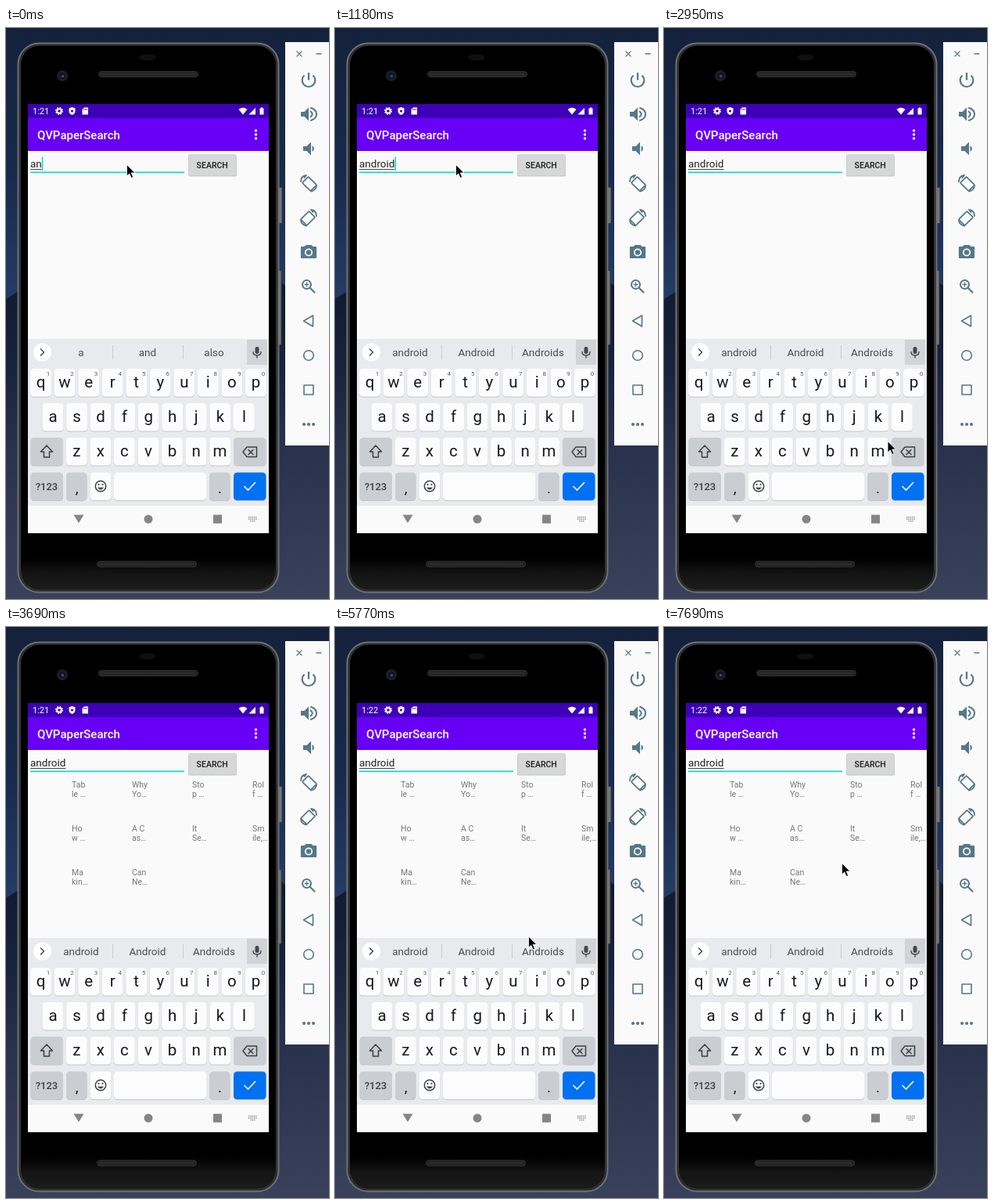
Animation, 413 px wide and 729 px high, one loop 8000 ms. Source, as an HTML page:

```html
<!DOCTYPE html>
<html lang="en">
<head>
<meta charset="utf-8">
<title>Article search</title>
<style>
  html, body { margin: 0; height: 100%; overflow: hidden; background: #14213b; }
  svg { display: block; width: 100%; height: 100%; }
  text { font-family: Roboto, sans-serif; }
  .mid { text-anchor: middle; }
  .line { fill: none; stroke-linecap: round; stroke-linejoin: round; }
</style>
</head>
<body>
<svg viewBox="0 0 413 729">
  <defs>
    <linearGradient id="sky" x2="0" y2="1">
      <stop offset="0" stop-color="#14213b"/>
      <stop offset=".25" stop-color="#182a4b"/>
      <stop offset=".5" stop-color="#263e68"/>
    </linearGradient>
    <linearGradient id="hill" x2="0" y2="1">
      <stop offset="0" stop-color="#0f182d"/>
      <stop offset=".3" stop-color="#17223c"/>
      <stop offset=".55" stop-color="#29324c"/>
      <stop offset="1" stop-color="#3a415a"/>
    </linearGradient>
    <linearGradient id="body" x2="0" y2="1">
      <stop offset=".94" stop-color="#000"/>
      <stop offset=".97" stop-color="#151515"/>
      <stop offset="1" stop-color="#1c1c1c"/>
    </linearGradient>
    <clipPath id="screen"><rect x="28" y="97" width="308" height="548"/></clipPath>
  </defs>

  <!-- Desktop -->
  <rect width="413" height="729" fill="url(#sky)"/>
  <path d="M0 346L16 336L200 300L349 322L413 380V729H0Z" fill="url(#hill)"/>

  <!-- Phone -->
  <g fill="#74777a" stroke="#35383b">
    <rect x="347.500" y="203.500" width="5.500" height="46" rx="1"/>
    <rect x="347.500" y="309.500" width="4.500" height="95" rx="1"/>
  </g>
  <rect x="15.500" y="19.500" width="333" height="701" rx="27" fill="#2a2b2d" stroke="#6e7174" stroke-width="2"/>
  <rect x="18.500" y="22" width="327" height="696" rx="25" fill="url(#body)" stroke="#38393b"/>
  <ellipse cx="181" cy="37.500" rx="11" ry="4" fill="#0f1012"/>
  <circle cx="72" cy="61" r="7" fill="#1d1f22"/>
  <circle cx="72" cy="61" r="4" fill="#0c1526"/>
  <circle cx="72.500" cy="61.500" r="1.800" fill="#314d88"/>
  <g fill="#202122" stroke="#333">
    <rect x="118.500" y="55.500" width="127" height="7" rx="3.500"/>
    <rect x="116.500" y="681" width="127" height="7" rx="3.500"/>
  </g>
  <path d="M121 59H243M119 684.500H241" stroke="#353637" stroke-width="3" stroke-dasharray="1 1"/>

  <g clip-path="url(#screen)">
    <rect x="28" y="97" width="308" height="548" fill="#fafafa"/>

    <!-- Status and app bars -->
    <rect x="28" y="97" width="308" height="18" fill="#3d00b7"/>
    <rect x="28" y="115" width="308" height="42" fill="#6800f5"/>
    <g fill="#fff">
      <text id="clock" x="34" y="110" font-size="11"></text>
      <circle cx="68" cy="106" r="2.800" fill="none" stroke="#fff" stroke-width="2"/>
      <circle cx="68" cy="106" r="4.300" fill="none" stroke="#fff" stroke-width="1.400" stroke-dasharray="1.800 1.577"/>
      <path d="M84.500 101L88.500 102.500V106Q88.500 109.500 84.500 111Q80.500 109.500 80.500 106V102.500Z"/>
      <circle cx="84.500" cy="106" r="1.600" fill="#3d00b7"/>
      <path d="M100 101.500H105V110.500H97.500V104Z"/>
      <path d="M99.800 103V105M101.600 103V105M103.400 103V105" stroke="#3d00b7" stroke-width=".8"/>
      <path d="M297.500 104Q303 99.500 308.500 104L303 110.500Z"/>
      <path d="M310.500 110.500L319 102V110.500Z"/>
      <path d="M326 101.500H328V102.500H329.500V110.500H324.500V102.500H326Z"/>
      <text x="40" y="142" font-size="15" font-weight="500">QVPaperSearch</text>
      <circle cx="319.500" cy="131" r="1.700"/>
      <circle cx="319.500" cy="136" r="1.700"/>
      <circle cx="319.500" cy="141" r="1.700"/>
    </g>

    <!-- Search form -->
    <text id="query" x="31" y="178" font-size="13.500" fill="#212121"></text>
    <rect id="underline" x="31" y="180" height="1" fill="#444"/>
    <rect x="31" y="183.500" width="197" height="1.700" fill="#10d9ca"/>
    <rect id="caret" y="164.500" width="1.600" height="17.500" fill="#10d9ca"/>
    <rect x="233" y="162" width="62" height="27.500" rx="2" fill="#c3c3c3"/>
    <rect id="button" x="233.500" y="161" width="61" height="27.500" rx="2"/>
    <text class="mid" x="263.700" y="179" font-size="10.500" font-weight="500" fill="#1c1c1c">SEARCH</text>

    <!-- Results -->
    <rect id="ripple" x="182" y="249" width="77" height="56.500" rx="8" fill="#d9d9d9"/>
    <g id="results" font-size="10.500" fill="#757575"></g>

    <!-- Keyboard -->
    <rect x="28" y="397" width="308" height="213" fill="#e8eaed"/>
    <rect x="308" y="398" width="26" height="32" fill="#d1d3d7"/>
    <circle cx="46.500" cy="414" r="11.500" fill="#fff"/>
    <path class="line" d="M44.500 410L48.500 414L44.500 418" stroke="#42464b" stroke-width="1.500"/>
    <path d="M136.500 405V423M226.500 405V423" stroke="#c9cbcf"/>
    <g id="suggestions" class="mid" font-size="13.500" fill="#4a4d52"></g>
    <rect x="318.500" y="407" width="5" height="9" rx="2.500" fill="#42464b"/>
    <path class="line" d="M316 413.500Q316 418 321 418Q326 418 326 413.500M321 418V421" stroke="#42464b" stroke-width="1.400"/>
    <g id="keys" class="mid" fill="#16181a"></g>
    <g class="line" stroke="#3c4043" stroke-width="1.500">
      <path d="M52 533L44.500 541H48.500V548H55.500V541H59.500Z"/>
      <path d="M308 535H320.500V547.500H308L303 541.200ZM310 538.500L316 544.500M316 538.500L310 544.500"/>
      <circle cx="121" cy="585" r="6.700"/>
      <path d="M117.500 587Q121 591.500 124.500 587Z" fill="#3c4043" stroke-width=".5"/>
      <path d="M118.500 582.800V582.900M123.500 582.800V582.900" stroke-width="2"/>
      <path d="M305 585.500L309.500 590L318.500 580.500" stroke="#fff" stroke-width="1.700"/>
    </g>

    <!-- Navigation bar -->
    <g fill="#858585">
      <path d="M86.500 621.500H99.500L93 632Z"/>
      <circle cx="182" cy="627" r="5.500"/>
      <rect x="265" y="621.500" width="11" height="11"/>
      <path d="M310 624.500H321M310 627H321M312.500 629.500H318.500" stroke="#858585" stroke-width="1.300" stroke-dasharray="1.300 1"/>
    </g>
  </g>

  <!-- Emulator toolbar -->
  <rect x="357" y="18" width="56" height="515" fill="#fafafa"/>
  <g class="line" stroke="#557888" stroke-width="2.200">
    <path d="M372 30L378 36M378 30L372 36M397 33H403" stroke-width="1.300"/>
    <path d="M387 57V66.500M381.500 60.500A8.300 8.300 0 1 0 392.500 60.500" stroke-linecap="butt"/>
    <g fill="#557888" stroke="none">
      <path d="M377 107H381.500L387 101.500V118.500L381.500 113H377Z"/>
      <path d="M380 151H384.500L390 145.500V162.500L384.500 157H380Z"/>
      <path d="M391.500 150Q396.500 154 391.500 158Z"/>
    </g>
    <path d="M389.500 106.500Q394 110 389.500 113.500M390 102Q397 104.500 397 110Q397 115.500 390 118" stroke-width="2"/>
    <g id="rotate" stroke-width="1.800">
      <rect x="-7.500" y="-5.500" width="15" height="11" rx="1" transform="translate(388 199) rotate(45)"/>
      <path d="M377 196Q377 189 384 188L381.500 191M397 201Q397 207 390 208.500"/>
    </g>
    <use href="#rotate" transform="translate(774 44) scale(-1 1)"/>
    <path d="M378 280H382.500L384 278H390L391.500 280H396V293H378Z" fill="#557888"/>
    <circle cx="387" cy="286.500" r="4.200" fill="#557888" stroke="#fafafa" stroke-width="1.800"/>
    <circle cx="384.500" cy="327.500" r="5.500" stroke-width="2"/>
    <path d="M389 332L394.500 337.500"/>
    <path d="M382 327.500H387M384.500 325V330" stroke-width="1.300"/>
    <g stroke-width="1.600">
      <path d="M380.500 374L392.500 367V381Z"/>
      <circle cx="387" cy="418" r="6.300"/>
      <rect x="381" y="456" width="12" height="12"/>
    </g>
    <path d="M381 506H381.100M387 506H387.100M393 506H393.100" stroke-width="4"/>
  </g>

  <path id="mouse" d="M0 0V14.500L3.300 11.500L5.700 17L8.200 16L5.800 10.500H10.500Z" fill="#000" stroke="#fff" stroke-width=".9"/>
</svg>

<script>
const LOOP = 8000, STEP = 147.5;
const $ = id => document.getElementById(id);
const label = (x, y, text, attrs = '') => `<text x="${x}" y="${y}" ${attrs}>${text}</text>`;

// Result grid
const headlines = ['Tab|le …', 'Why|Yo…', 'Sto|p …', 'Rol|f …', 'Ho|w …', 'A C|as…',
  'It|Se…', 'Sm|ile,…', 'Ma|kin…', 'Can|Ne…'];
$('results').innerHTML = headlines.map((headline, i) => {
  const x = 84 + i % 4 * 77, y = 205 + Math.floor(i / 4) * 56;
  return headline.split('|').map((part, row) => label(x, y + row * 12, part)).join('');
}).join('');

// Keyboard
const PITCH = 30.55, GREY = '#cacdd2';
const key = (x, y, width, fill = '#fcfcfd') =>
  `<rect x="${x}" y="${y + 1}" width="${width}" height="35.5" rx="4.5" fill="#c3c6ca"/>
   <rect x="${x}" y="${y}" width="${width}" height="35.5" rx="4.5" fill="${fill}"/>`;
const letterRow = (letters, firstX, y) => [...letters].map((letter, i) => {
  const x = firstX + i * PITCH;
  return key(x - 13.4, y, 26.8) + label(x, y + 24, letter, 'font-size="20.5"');
}).join('');
const digits = [...'1234567890'].map((digit, i) =>
  label(54 + i * PITCH, 444, digit, 'font-size="8" fill="#55585c"')).join('');
$('keys').innerHTML =
  letterRow('qwertyuiop', 44.5, 435) + digits +
  letterRow('asdfghjkl', 60, 479) +
  key(31.5, 523, 41.5, GREY) + letterRow('zxcvbnm', 90.3, 523) + key(291, 523, 41.5, GREY) +
  key(31.5, 567.5, 41.5, GREY) + label(52, 590, '?123', 'font-size="13" font-weight="500" fill="#3c4043"') +
  key(77, 567.5, 26.5, GREY) + label(90.5, 594, ',', 'font-size="19"') +
  key(107.6, 567.5, 26.8) + key(138, 567.5, 118) +
  key(260, 567.5, 26.5, GREY) + label(273.5, 594, '.', 'font-size="19"') +
  key(291, 567.5, 41.5, '#0071f2');

// Typed text with its three suggestions
const typing = [
  [0, 'an', 'a', 'and', 'also'],
  [150, 'and', 'and', 'android', 'Android'],
  [440, 'andr', 'andr', 'android', 'Android'],
  [590, 'andro', 'andro', 'android', 'Android'],
  [880, 'androi', 'androi', 'android', 'Android'],
  [1030, 'android', 'android', 'Android', 'Androids'],
];

// Pointer paths: time, x, y; the pointer is hidden between them
const pointerPaths = [
  [[0, 154.5, 174.5], [1180, 154.5, 174.5], [1770, 254, 176.5], [2510, 254, 176.5], [2650, 278, 335],
    [2800, 284, 378], [2950, 286, 527.5], [3100, 286, 539], [3240, 286, 624], [3389, 286, 624]],
  [[4270, 300, 661], [4570, 308, 620], [4720, 309.5, 609], [4870, 309.5, 605], [5020, 309.5, 604],
    [5770, 246, 390], [5900, 227.5, 301.5], [LOOP, 227.5, 301.5]],
];

function pointerAt(time) {
  const path = pointerPaths.find(p => time >= p[0][0] && time < p[p.length - 1][0]);
  if (!path) return null;
  const next = path.findIndex(point => point[0] > time);
  const [t0, x0, y0] = path[next - 1], [t1, x1, y1] = path[next];
  const k = (time - t0) / (t1 - t0);
  return [x0 + (x1 - x0) * k, y0 + (y1 - y0) * k];
}

let shownQuery;
function showQuery(time) {
  const [, query, ...suggestions] = typing.filter(entry => entry[0] <= time + 8).pop();
  if (query === shownQuery) return;
  shownQuery = query;
  $('query').textContent = query;
  $('suggestions').innerHTML = suggestions.map((word, i) => label(96 + i * 85, 419, word)).join('');
  const width = $('query').getComputedTextLength();
  $('underline').setAttribute('width', width);
  $('caret').setAttribute('x', 31 + width);
}

const show = (id, visible) => $(id).setAttribute('visibility', visible ? 'visible' : 'hidden');

function draw(now) {
  const time = Math.floor(now % LOOP / STEP) * STEP;
  showQuery(time);
  const blink = time % 1000;
  show('caret', time < 1600 || blink >= 90 && blink < 590);
  $('clock').textContent = time < 4200 ? '1:21' : '1:22';
  $('button').setAttribute('fill', time >= 2060 && time < 2400 ? '#bfbfbf' : '#d6d7d7');
  show('results', time >= 3680);
  show('ripple', time >= 6630 && time < 6900);
  $('ripple').setAttribute('opacity', time < 6780 ? 1 : 0.5);

  const pointer = pointerAt(time);
  show('mouse', pointer);
  if (pointer) $('mouse').setAttribute('transform', `translate(${pointer})`);
  requestAnimationFrame(draw);
}
requestAnimationFrame(draw);
</script>
</body>
</html>
```
